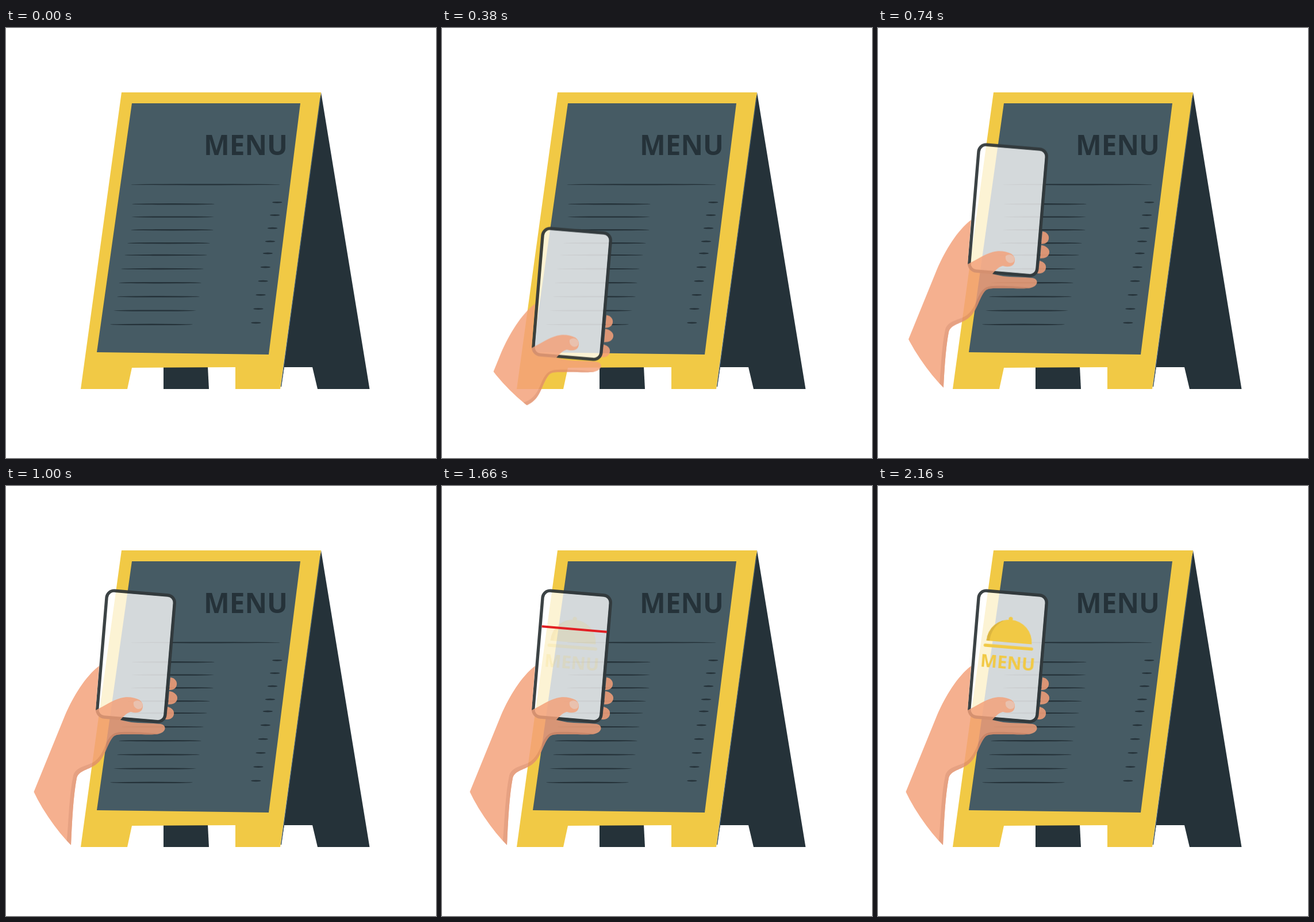
An HTML page for the animation above (2.6 s loop, 748 by 748 pixels).

```html
<!DOCTYPE html>
<html lang="en">
<head>
<meta charset="utf-8">
<title>Menu board</title>
<style>
  html, body { margin: 0; width: 100%; height: 100%; overflow: hidden; background: #fff; }
  svg { display: block; width: 100vw; height: 100vh; }
  text { font-family: "Open Sans", "Noto Sans", sans-serif; font-weight: 700; }

  .arm, .line, .dish { animation: 2600ms linear infinite; }
  .arm { animation-name: rise; }
  .line { animation-name: scan; }
  .dish { animation-name: reveal; }

  @keyframes rise {
    0% { transform: translateY(563.6px); animation-timing-function: cubic-bezier(.2, .243, .279, 1); }
    38.23%, 100% { transform: none; }
  }
  @keyframes scan {
    0%, 53.8% { transform: translateY(-79px); opacity: 0; }
    53.85% { transform: translateY(-79px); opacity: 1; }
    56.92% { transform: translateY(-73.3px); }
    70.77% { transform: translateY(-21.4px); }
    82.6% { transform: translateY(22.5px); opacity: 1; }
    82.69%, 100% { transform: translateY(22.5px); opacity: 0; }
  }
  @keyframes reveal {
    0%, 60.77% { opacity: 0; animation-timing-function: ease; }
    83.08%, 100% { opacity: 1; }
  }
</style>
</head>
<body>
<svg viewBox="0 0 748 748">
  <defs>
    <clipPath id="round"><circle cx="374" cy="374" r="362"/></clipPath>
    <clipPath id="dome"><path d="M-39.5-24a39.5 39.5 0 0 1 79 0z"/></clipPath>
  </defs>

  <!-- board -->
  <g fill="#253239">
    <path d="M548 112L632.5 628H542L533 590H484L478 628Z"/>
    <path d="M274 589H351L353 628H274Z"/>
  </g>
  <path fill="#f1c945" d="M201 112H548L477 628H399V590L219 591L211 628H130Z"/>
  <path d="M547 121L478.5 624" stroke="#455a64" stroke-width="1.4"/>
  <path fill="#465b64" d="M219 131H512L457 568L158 564Z"/>
  <text x="344" y="220.5" font-size="47.5" fill="#253239">MENU</text>
  <g id="rows" fill="#253239"></g>

  <g clip-path="url(#round)">
    <g class="arm">
      <!-- fingertips -->
      <g fill="#f49f79" opacity=".86">
        <path d="M286 333C294 334 298 340 297 346C296 352 291 355 284 355Z"/>
        <path d="M284 357C293 358 299 364 298 370C297 377 291 380 282 380Z"/>
        <path d="M281 384C289 386 293 391 292 397C291 403 286 407 277 406Z"/>
      </g>

      <!-- phone -->
      <g transform="translate(226 296) rotate(4.8)">
        <rect x="-57" y="-108" width="114" height="216" rx="10" fill="#fff" fill-opacity=".77"/>
        <rect x="-59.3" y="-110.3" width="118.6" height="220.6" rx="13" fill="none"
              stroke="#32393c" stroke-width="5.4" stroke-opacity=".95"/>
        <g class="dish" fill="#f1c945">
          <circle cx="-.4" cy="-65" r="3.6"/>
          <g clip-path="url(#dome)">
            <rect x="-40" y="-64" width="80" height="40"/>
            <path d="M-34-24C-33-44-22-58-6-64H-40V-24Z" fill="#dcb53f"/>
          </g>
          <path d="M-41-15.7H40" stroke="#f1c945" stroke-width="5.4" stroke-linecap="round"/>
          <text x="-47" y="21.8" font-size="31">MENU</text>
        </g>
        <path class="line" d="M-56.5 0H57" stroke="#e21f23" stroke-width="4"/>
      </g>

      <!-- hand -->
      <g opacity=".84">
        <path fill="#f4a17a" d="M162 313C138 331 117 366 103 398L48 533L-40 750H108
          C109 700 111 660 113 625C115 580 117 540 123 508C127 494 144 494 157 484
          C172 473 174 453 185 438C190 431 198 432 212 432C232 431 252 434 266 431
          C279 428 280 416 269 414C253 412 232 413 218 411C211 410 205 408 199 407
          C203 402 209 395 217 393C225 395 232 395 236 390C240 383 238 376 232 372
          C222 367 210 366 199 369C185 373 172 382 156 390Z"/>
        <path fill="#e28f6a" d="M108 750C109 700 111 660 113 625C115 580 117 540 123 508
          C127 494 144 494 157 484C172 473 174 453 185 438C190 431 198 432 212 432
          C232 431 252 434 266 431C250 430 225 427 201 428C187 428 181 434 175 446
          C168 463 163 474 151 481C137 488 121 489 117 504C110 537 109 580 106 615L100 750Z"/>
        <path fill="#edbda6" d="M222 376C226 372 233 372 237 378C239 384 236 388 230 388C224 387 221 382 222 376Z"/>
      </g>
    </g>
  </g>
</svg>
<script>
  const rows = document.getElementById('rows');
  const stroke = (x, y, w, ry) => {
    const e = document.createElementNS('http://www.w3.org/2000/svg', 'ellipse');
    const box = { cx: x + w / 2, cy: y, rx: w / 2, ry };
    for (const k in box) e.setAttribute(k, box[k]);
    rows.append(e);
  };
  const starts = [219, 218, 217, 211, 206, 200, 196, 193, 187, 181];
  const tops = [306.3, 328.6, 351.2, 374.2, 395, 419, 443.2, 467.3, 491.6, 515.8];

  stroke(217, 272.3, 260, 1.1);
  starts.forEach((x, i) => {
    stroke(x, tops[i], 144, 1.2);
    stroke(463 - 4.1 * i, tops[i] - 3, 17.5, 1.4);
  });
</script>
</body>
</html>
```
